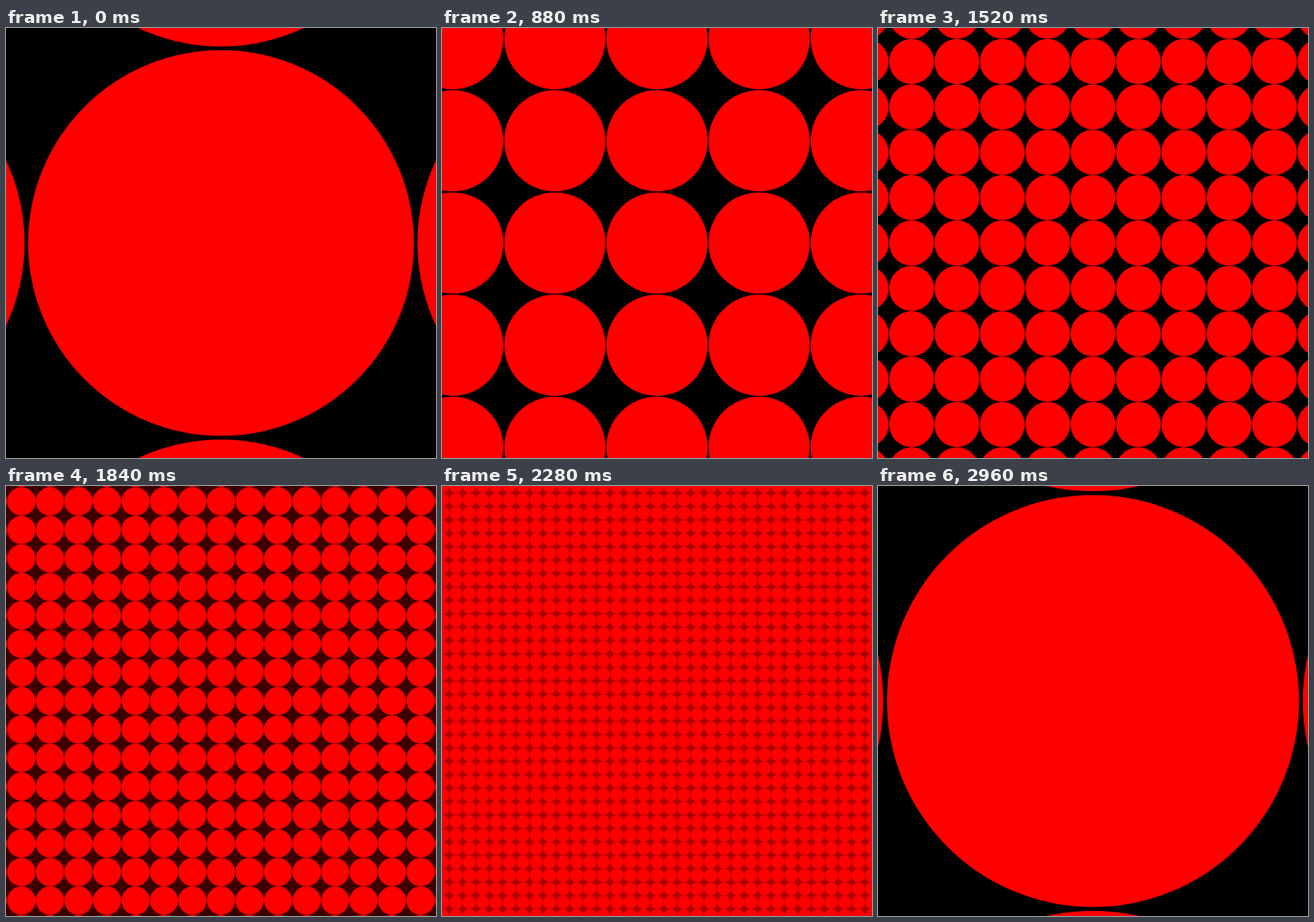
Animation, 500 px wide and 500 px high, one loop 3 s. Source, as an HTML page with a canvas:

```html
<!DOCTYPE html>
<html lang="en">
<head>
<meta charset="utf-8">
<title>Dot zoom</title>
<style>
  html, body { margin: 0; width: 100%; height: 100%; overflow: hidden; background: #000; }
  canvas { display: block; width: 100vw; height: 100vh; }
</style>
</head>
<body>
<canvas id="stage" width="500" height="500"></canvas>
<script>
const SIZE = 500, MID = SIZE / 2;
const STEP = 40, STEPS = 75;
const SOLID_FROM = 65, RESTART = 69;
const FADE_FROM = 40;
const DOT = 0.991; // dot diameter relative to the grid pitch

// [step, grid pitch in px]; the zoom is smooth in log space
const zoom = [
  [-6, 676], [-1, 483.5], [0, 452.7], [13, 184], [22, 118.8],
  [38, 52.75], [46, 33.15], [57, 15.6], [65, 8.1]
].map(([t, p]) => [t, Math.log(p)]);

const ctx = document.getElementById('stage').getContext('2d');

function slope(i) {
  const rate = k => (zoom[k + 1][1] - zoom[k][1]) / (zoom[k + 1][0] - zoom[k][0]);
  if (i === 0) return rate(0);
  if (i === zoom.length - 1) return rate(i - 1);
  const before = zoom[i][0] - zoom[i - 1][0];
  const after = zoom[i + 1][0] - zoom[i][0];
  return (rate(i - 1) * after + rate(i) * before) / (before + after);
}

function pitchAt(t) {
  let i = 0;
  while (i < zoom.length - 2 && t >= zoom[i + 1][0]) i++;
  const [t0, a] = zoom[i], [t1, b] = zoom[i + 1];
  const h = t1 - t0, u = (t - t0) / h, v = 1 - u;
  return Math.exp(
    v * v * (1 + 2 * u) * a + u * u * (1 + 2 * v) * b +
    h * u * v * (v * slope(i) - u * slope(i + 1))
  );
}

function draw(step) {
  if (step >= SOLID_FROM && step < RESTART) {
    ctx.fillStyle = '#f00';
    ctx.fillRect(0, 0, SIZE, SIZE);
    return;
  }
  const fade = Math.max(0, (step - FADE_FROM) / (SOLID_FROM - FADE_FROM));
  const red = step < RESTART ? Math.round(255 * fade) : 0;
  ctx.fillStyle = `rgb(${red}, 0, 0)`;
  ctx.fillRect(0, 0, SIZE, SIZE);

  const pitch = pitchAt(step < RESTART ? step : step - STEPS);
  const r = pitch * DOT / 2;
  const n = Math.ceil(MID / pitch);
  ctx.fillStyle = '#f00';
  ctx.beginPath();
  for (let row = -n; row <= n; row++) {
    for (let col = -n; col <= n; col++) {
      const x = MID + col * pitch, y = MID + row * pitch;
      ctx.moveTo(x + r, y);
      ctx.arc(x, y, r, 0, Math.PI * 2);
    }
  }
  ctx.fill();
}

const start = performance.now();
let shown = -1;

function tick() {
  const elapsed = Math.max(0, performance.now() - start);
  const step = Math.floor(elapsed / STEP) % STEPS;
  if (step !== shown) draw(shown = step);
  requestAnimationFrame(tick);
}
tick();
</script>
</body>
</html>
```
